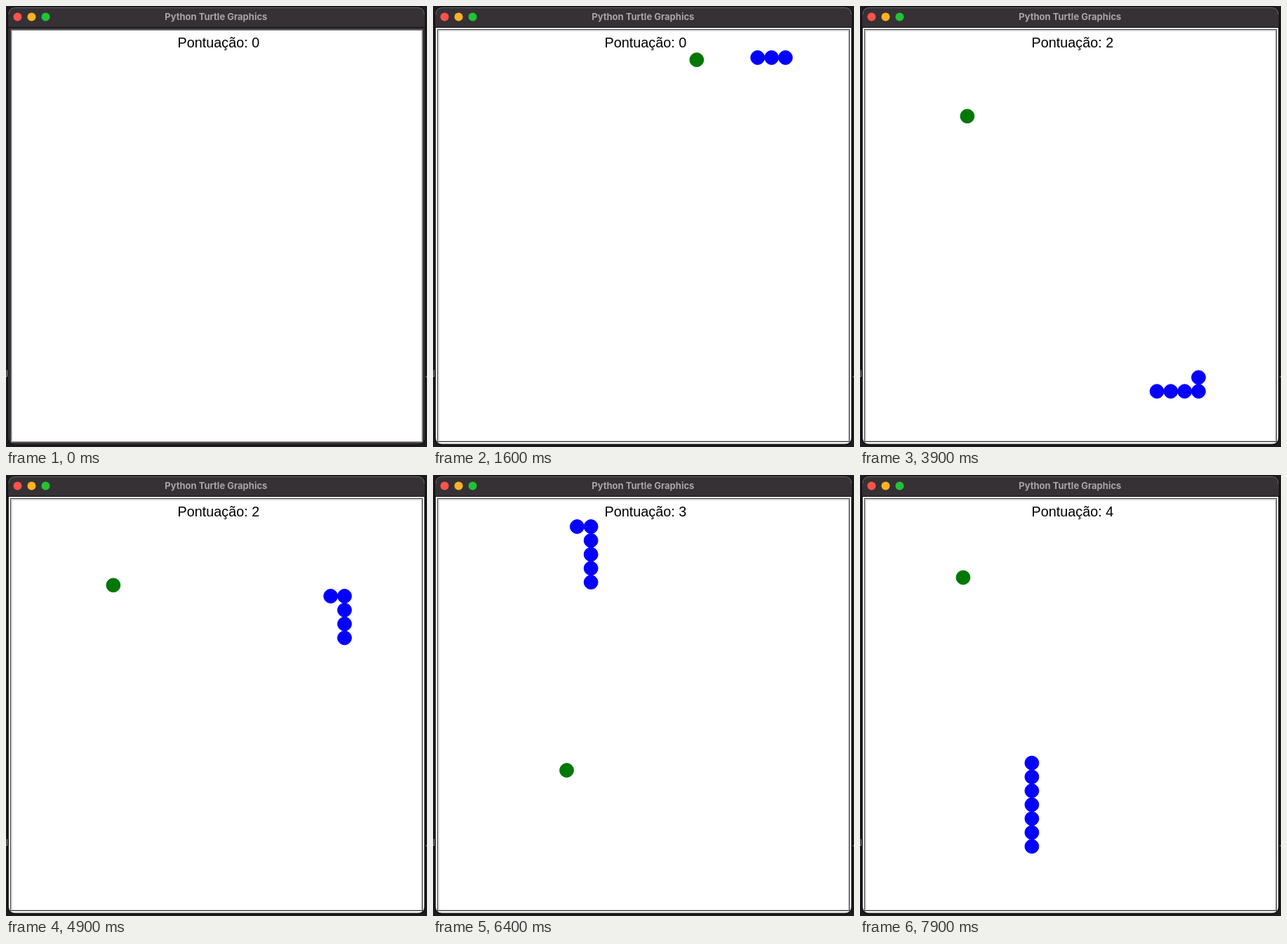
Write an HTML page that moves like this. It is 600 by 628 pixels and loops after 8 s.

```html
<!DOCTYPE html>
<html lang="pt">
<head>
<meta charset="utf-8">
<title>Snake</title>
<style>
  html, body { margin: 0; width: 100%; height: 100%; overflow: hidden; background: #1d1c1e; }
  svg { display: block; width: 600px; height: 628px; }
  .title { font: 700 13px Inter, Roboto, sans-serif; fill: #a8a4a7; }
  .score { font: 19.8px "Liberation Sans", Arial, sans-serif; fill: #000; }
  text { text-anchor: middle; white-space: pre; }
</style>
</head>
<body>
<svg viewBox="0 0 600 628" xmlns="http://www.w3.org/2000/svg">
  <rect width="600" height="628" fill="#1d1c1e"/>
  <path d="M0 527.5h1.5v-9" fill="none" stroke="#a5a5a5"/>
  <path d="M598 528h2" stroke="#999"/>

  <rect x="2.5" y="1" width="595" height="624" rx="10" fill="#353135" stroke="#0b0b0c"/>
  <path d="M4 12Q4 2.5 13 2.5H587Q596 2.5 596 12" fill="none" stroke="#676367"/>
  <path d="M3 30.5H597" stroke="#0d0c0d"/>
  <circle cx="16.5" cy="15.5" r="6" fill="#ff524a"/>
  <circle cx="36.5" cy="15.5" r="6" fill="#fdb224"/>
  <circle cx="56.5" cy="15.5" r="6" fill="#22c236"/>
  <text class="title" x="299.3" y="20">Python Turtle Graphics</text>

  <g id="idle">
    <rect x="7.75" y="34.25" width="585.5" height="586.5" fill="#fff" stroke="#858585" stroke-width="1.5"/>
  </g>
  <g id="focused">
    <path d="M4 31H596V614Q596 623.5 587 623.5H13Q4 623.5 4 614Z" fill="#fff"/>
    <rect x="6.5" y="33.5" width="587" height="587" fill="#fff" stroke="#3c3c3c"/>
    <rect x="8" y="35" width="584.5" height="584.5" fill="#fff" stroke="#b4b4b4"/>
  </g>

  <text class="score" id="score" x="302.9" y="59.2"></text>
  <g id="game"></g>
</svg>
<script>
const LOOP = 8000, FRAME = 100;
const STEPS_PER_MS = 0.01905, START_STEP = -0.56;
const CELL = 19.8, ORIGIN = { x: 284.5, y: 73.5 };
const START_LENGTH = 3;
const ROUTE = "R14 U13 L13 D24 R10 U19 L17 U5 R4 D8 L1 D15 R2 U6";
const DIRECTIONS = { R: [1, 0], L: [-1, 0], U: [0, -1], D: [0, 1] };

// Each food disappears when the head reaches the given step.
const FOODS = [
  { x: 375.8, y: 76.6, eaten: 33 },
  { x: 426.2, y: 531.4, eaten: 69 },
  { x: 152.9, y: 156.9, eaten: 108 },
  { x: 190.5, y: 420.5, eaten: 135 },
  { x: 147, y: 146, eaten: Infinity }
];

const $ = id => document.getElementById(id);

function buildTrail() {
  let col = -1, row = 13;
  const trail = [[col, row]];
  for (const leg of ROUTE.split(" ")) {
    const [dx, dy] = DIRECTIONS[leg[0]];
    for (let n = +leg.slice(1); n > 0; n--) trail.push([col += dx, row += dy]);
  }
  return trail;
}

function makeDot(color) {
  const dot = document.createElementNS("http://www.w3.org/2000/svg", "polygon");
  const corners = Array.from({ length: 20 }, (_, i) => {
    const a = i * Math.PI / 10;
    return (9.9 * Math.cos(a)).toFixed(2) + "," + (9.9 * Math.sin(a)).toFixed(2);
  });
  dot.setAttribute("points", corners.join(" "));
  dot.setAttribute("fill", color);
  dot.setAttribute("stroke", color);
  $("game").append(dot);
  return dot;
}

const moveTo = (dot, x, y) => dot.setAttribute("transform", `translate(${x} ${y})`);
const show = (node, visible) => node.setAttribute("display", visible ? "inline" : "none");

const trail = buildTrail();
const foodDot = makeDot("#007805");
const body = Array.from({ length: START_LENGTH + FOODS.length - 1 }, () => makeDot("#0400ff"));

function draw(time) {
  const t = Math.floor(time / FRAME) * FRAME;
  const started = t > 0;
  const step = Math.max(0, Math.floor(t * STEPS_PER_MS + START_STEP));
  const score = FOODS.filter(f => f.eaten <= step).length;
  const length = START_LENGTH + FOODS.filter(f => f.eaten < step).length;
  const head = Math.min(step + START_LENGTH - 1, trail.length - 1);

  show($("idle"), !started);
  show($("focused"), started);
  show($("game"), started);
  $("score").textContent = "Pontuação: " + score;
  moveTo(foodDot, FOODS[score].x, FOODS[score].y);
  body.forEach((dot, i) => {
    show(dot, i < length);
    if (i >= length) return;
    const [col, row] = trail[head - i];
    moveTo(dot, ORIGIN.x + col * CELL, ORIGIN.y + row * CELL);
  });
}

const begin = performance.now();
function tick() {
  draw((performance.now() - begin) % LOOP);
  requestAnimationFrame(tick);
}
tick();
</script>
</body>
</html>
```
